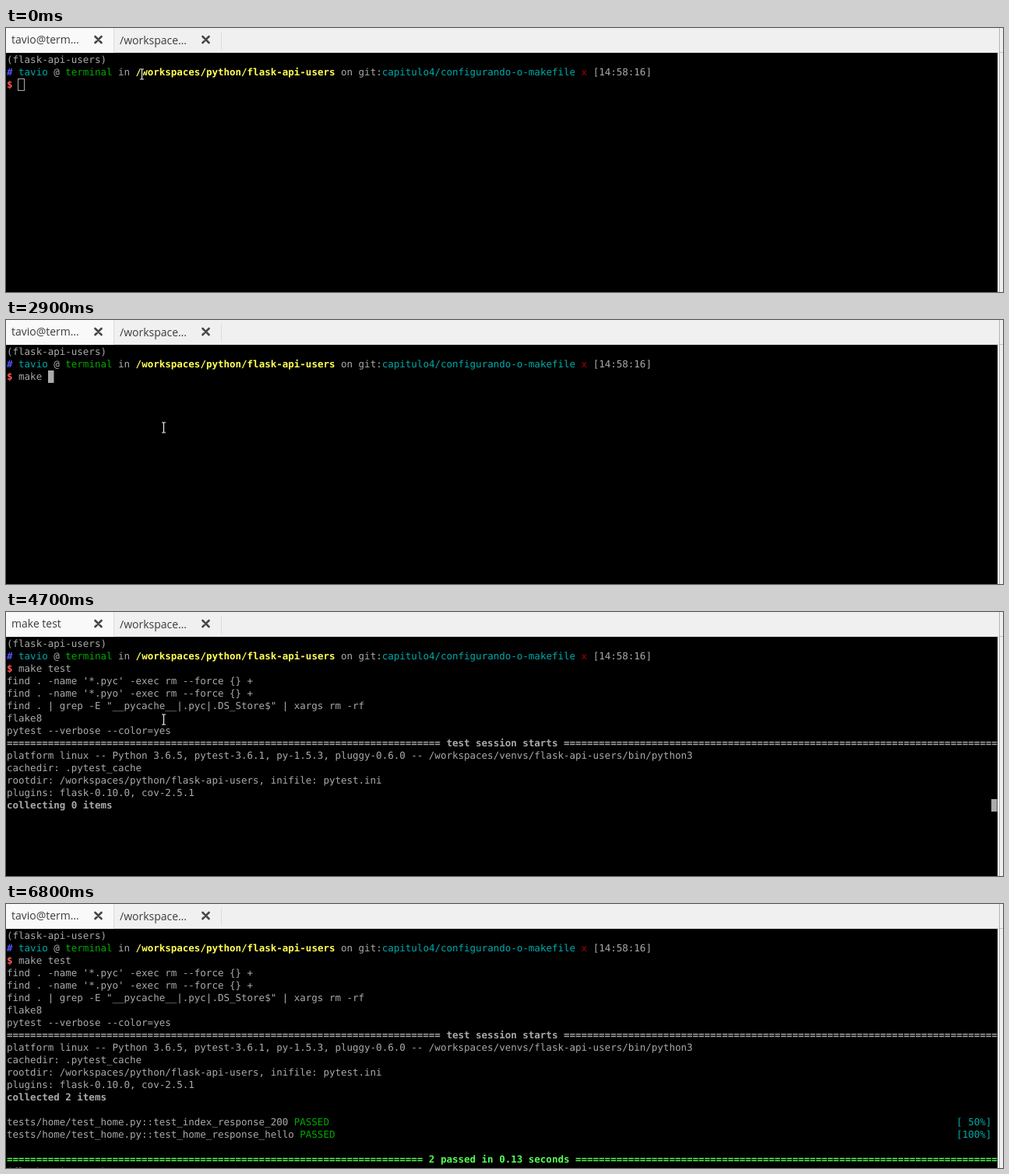
An HTML page that plays this animation: 1280x340 px, repeating every 7.1 s.

```html
<!DOCTYPE html>
<html lang="en">
<head>
<meta charset="utf-8">
<title>Terminal test run</title>
<style>
html, body { margin: 0; width: 100%; height: 100%; overflow: hidden; background: #000; }
svg, pre { position: absolute; left: 0; top: 0; }
pre {
  margin: 0; left: 1px; top: 33px;
  font: 12.5px/16px "DejaVu Sans Mono", monospace;
  text-rendering: geometricPrecision;
  font-variant-ligatures: none;
  color: #aaa;
}
svg text { font: 14px "Open Sans", "Noto Sans", sans-serif; fill: #3c3c3c; }
.blue { color: #55f; } .cyan { color: #0aa; } .green { color: #0a0; }
.yellow { color: #ff5; } .red { color: #a00; } .pink { color: #f55; } .lime { color: #5f5; }
</style>
</head>
<body>
<svg width="1280" height="340">
  <rect width="1280" height="32" fill="#f0f0f0"/>
  <rect width="138" height="32" fill="#f9f9f9"/>
  <path d="M138.5 0V31.5H1280M276.5 5V28" fill="none" stroke="#dcdcdc"/>
  <rect x="1273" y="32" width="7" height="308" fill="#f0f0f0"/>
  <path d="M1275.5 0V340" stroke="#b4b4b4"/>
  <path d="M1276 31.5H1280" stroke="#c4c4c4"/>
  <path d="M114.5 11l8 8m0-8l-8 8M252.500 11l8 8m0-8l-8 8" stroke="#474747" stroke-width="2.6" stroke-linecap="round"/>
  <text id="title" x="7" y="20"></text>
  <text x="146" y="21">/workspace…</text>
</svg>
<pre id="screen"></pre>
<svg width="1280" height="340">
  <rect id="caret" stroke="#aaa"/>
  <g id="beam">
    <path d="M-2.500-6.500H2.500M0-6.500V6.500M-2.500 6.500H2.500" stroke="#000" stroke-width="3" fill="none"/>
    <path d="M-2.500-6.500H2.500M0-6.500V6.500M-2.500 6.500H2.500" stroke="#eee" stroke-width="1.200" fill="none"/>
  </g>
  <path id="arrow" d="M0 0V14L3.500 11L6 16.500L8.300 15.500L6 10H10.500Z" fill="#111" stroke="#fff"/>
</svg>
<script>
const LOOP = 7100, CELL = 7.526, ROW = 16;
const $ = id => document.getElementById(id);
const paint = (color, text) => `<span class="${color}">${text}</span>`;
const bold = (color, text) => `<b class="${color}">${text}</b>`;
const rule = (left, text, right) => "=".repeat(left) + ` ${text} ` + "=".repeat(right);
const result = (name, status) =>
  `tests/home/test_home.py::${name} ${paint("green", "PASSED")}`
  + " ".repeat(162 - 25 - name.length - 7) + paint("cyan", status);

const prompt = ["(flask-api-users)",
  `${bold("blue", "#")} ${paint("cyan", "tavio")} @ ${paint("green", "terminal")} in `
  + bold("yellow", "/workspaces/python/flask-api-users")
  + ` on git:${paint("cyan", "capitulo4/configurando-o-makefile")} ${paint("red", "x")} [14:58:16]`];
const cleanup = [
  "find . -name '*.pyc' -exec rm --force {} +",
  "find . -name '*.pyo' -exec rm --force {} +",
  'find . | grep -E "__pycache__|.pyc|.DS_Store$" | xargs rm -rf',
  "flake8"];
const session = [
  bold("", rule(74, "test session starts", 74)),
  "platform linux -- Python 3.6.5, pytest-3.6.1, py-1.5.3, pluggy-0.6.0 -- /workspaces/venvs/flask-api-users/bin/python3",
  "cachedir: .pytest_cache",
  "rootdir: /workspaces/python/flask-api-users, inifile: pytest.ini",
  "plugins: flask-0.10.0, cov-2.5.1"];
const report = [
  bold("", "collected 2 items"), "",
  result("test_index_response_200", "[ 50%]"),
  result("test_home_response_hello", "[100%]"), "",
  bold("lime", rule(71, "2 passed in 0.13 seconds", 72)),
  "(flask-api-users)"];

// Each entry: start time, then the values that hold until the next entry.
const typing = [[0, 0], [2400, 1], [2700, 2], [2800, 4], [2900, 5], [3000, 7], [3300, 8], [3500, 9]];
const pointer = [
  [0, "beam", 174, 60], [1200, "beam", 177, 46], [1300, "beam", 184, 66],
  [1400, "beam", 194, 104], [1500, "beam", 202, 139],
  [6300, "beam", 96, 112], [6400, "beam", 4, 82],
  [6600, "beam", 62, 48], [6700, "arrow", 137, 3], [6800, ""]];
const at = (steps, t) => steps.findLast(s => s[0] <= t);

function draw(t) {
  const typed = at(typing, t)[1];
  const lines = [...prompt, bold("pink", "$") + " " + "make test".slice(0, typed)];
  let col = 2 + typed, row = 2;
  if (t >= 3900) { lines.push(...cleanup); col = 0; row = 7; }
  if (t >= 4200) { lines.push("pytest --verbose --color=yes"); row = 8; }
  if (t >= 4700) { lines.push(...session); col = 168; row = 13; }
  if (t >= 4800) { lines.push(...report); row = 21; }
  else if (t >= 4700) lines.push(bold("", "collecting 0 items"));

  const html = lines.join("\n");
  if (html !== draw.last) $("screen").innerHTML = draw.last = html;
  $("title").textContent = t >= 3900 && t < 4800 ? "make test" : "tavio@term…";

  const caret = { x: Math.round(1 + col * CELL) - (col === 2 ? .5 : -.5), y: 33.5 + row * ROW,
    width: col === 2 ? 8 : 6.5, height: 15, fill: t < 1600 ? "none" : "#aaa" };
  for (const k in caret) $("caret").setAttribute(k, caret[k]);

  const [, shape, x, y] = at(pointer, t);
  for (const id of ["beam", "arrow"]) {
    $(id).style.display = id === shape ? "" : "none";
    if (id === shape) $(id).setAttribute("transform", `translate(${x + .5} ${y - .5})`);
  }
}

const start = performance.now();
function tick() {
  draw((performance.now() - start) % LOOP);
  requestAnimationFrame(tick);
}
tick();
</script>
</body>
</html>
```
